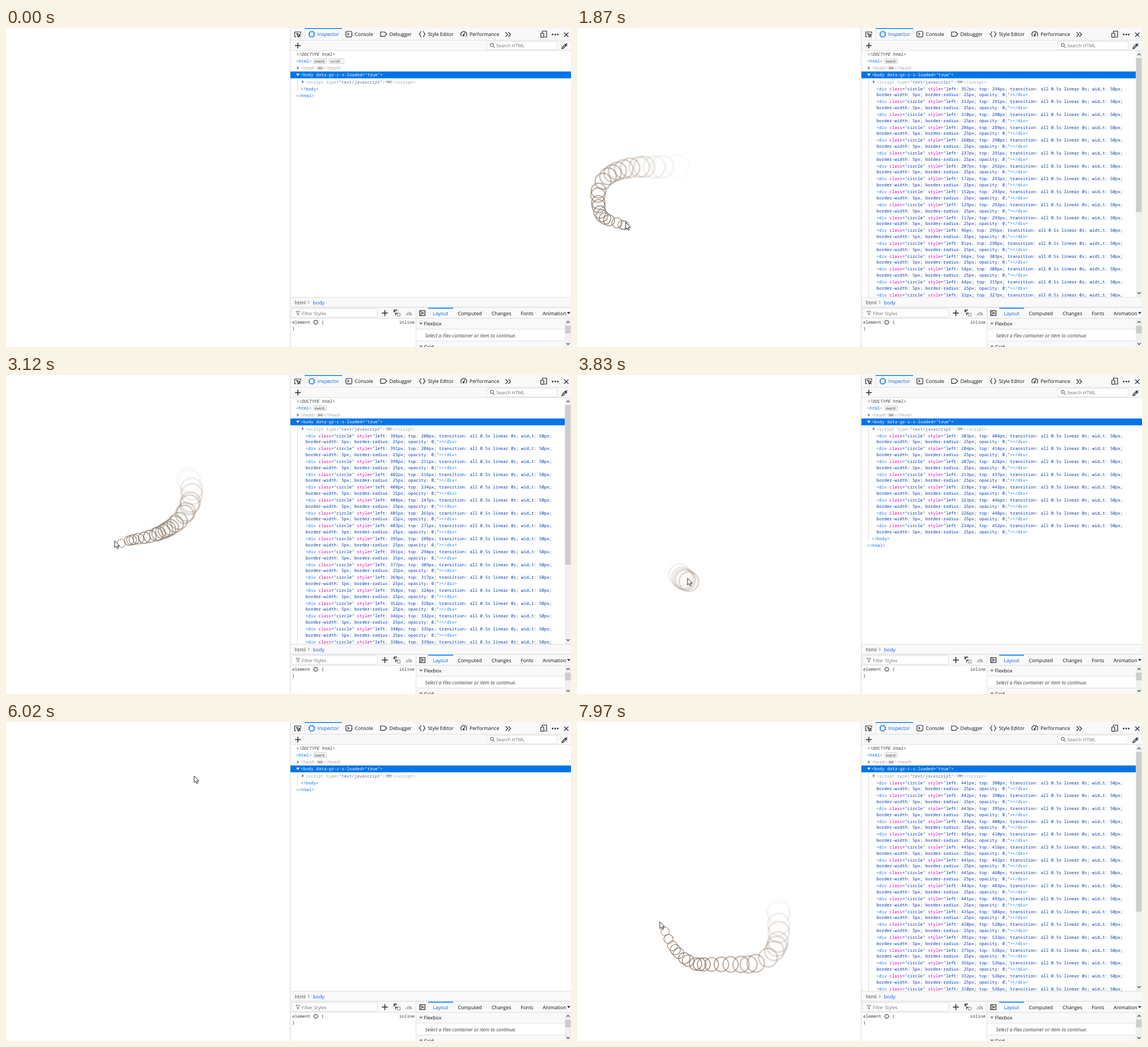
Animation, 997 px wide and 562 px high, one loop 8 s. Source, as an HTML page:

```html
<!DOCTYPE html>
<html lang="en">
<head>
<meta charset="utf-8">
<title>Cursor trail with inspector</title>
<style>
html, body { margin: 0; width: 100%; height: 100%; overflow: hidden; background: #fff; }
svg { display: block; width: 997px; height: 562px; }
text { white-space: pre; text-rendering: geometricPrecision; font: 8.65px "Open Sans", "Noto Sans", sans-serif; fill: #0c0c0d; }
.code text { font: 500 7.56px "Noto Sans Mono", "DejaVu Sans Mono", monospace; fill: #38383d; }
text.small { font-size: 8.2px; fill: #737373; }
text.blue { fill: #0060df; }
.code .tag { fill: #0074e8; }
.code .attr { fill: #dd00a9; }
.code .val { fill: #003eaa; }
.code .dim { fill: #a5a5a8; }
.code .sel { fill: #fff; }
.code .hot tspan { fill: #2b2108; }
.badge rect { fill: #f4f4f5; stroke: #c4c4c6; stroke-width: .8; }
.badge text { font-size: 6.8px; font-weight: 500; fill: #38383d; }
.icon { fill: none; stroke: #2a2a2e; stroke-width: 1.2; }
.edge { fill: none; stroke: #e0e0e2; }
.bar { fill: #f9f9fa; }
.track { fill: #f0f0f0; }
.thumb { fill: #cdcdcd; }
.arrow { fill: none; stroke: #505050; stroke-width: 1.3; }
.fold { fill: #8a8a8d; }
#trail circle { fill: none; stroke: #89725f; }
</style>
</head>
<body>
<svg viewBox="0 0 997 562">
  <g id="trail"></g>
  <g id="pageScroll">
    <rect class="track" y="550" width="502" height="12"/>
    <rect class="thumb" x="11" y="550.5" width="458" height="11"/>
    <path class="arrow" d="M6.5 553.5l-2.6 2.8 2.6 2.8M494 553.5l2.6 2.8-2.6 2.8"/>
  </g>

  <rect x="502" width="495" height="562" fill="#fff"/>
  <path d="M501.5 0v562" stroke="#d7d7da"/>
  <g class="code">
    <path id="guide" stroke="#dcdcde" fill="none"/>
    <rect x="502" y="76.6" width="495" height="12" fill="#0074e8"/>
    <text x="512" y="49.2" style="font-style:italic">&lt;!DOCTYPE html&gt;</text>
    <text x="512" y="61.2"><tspan class="tag">&lt;html&gt;</tspan></text>
    <path class="fold" d="M513.5 67.4l4 3-4 3z"/>
    <text x="520" y="73.3"><tspan class="dim">&lt;head&gt;</tspan></text>
    <text x="560" y="73.3"><tspan class="dim">&lt;/head&gt;</tspan></text>
    <path d="M511.8 80.6h6.4l-3.2 4z" fill="#fff"/>
    <text x="520" y="85.4"><tspan class="sel">&lt;body data-gr-c-s-loaded="true"&gt;</tspan></text>
    <path class="fold" d="M522 91.8l4 3-4 3z"/>
    <text x="528.6" y="97.6"><tspan class="dim">&lt;script type=</tspan><tspan fill="#5f6f96">"text/javascript"</tspan><tspan class="dim">&gt;</tspan></text>
    <text x="682" y="97.6"><tspan class="dim">&lt;/script&gt;</tspan></text>
    <g id="rows"></g>
    <g id="tail">
      <text x="520" y="3"><tspan class="tag">&lt;/body&gt;</tspan></text>
      <text x="512" y="15"><tspan class="tag">&lt;/html&gt;</tspan></text>
    </g>
  </g>
  <g class="badge">
    <rect x="542.8" y="54" width="22.6" height="8.6" rx="1.5"/><text x="545" y="60.5">event</text>
    <g id="scrollBadge"><rect x="570" y="54" width="26.5" height="8.6" rx="1.5"/><text x="572.6" y="60.5">scroll</text></g>
    <rect x="549" y="67.6" width="10" height="6" rx="1.5"/><rect x="670.5" y="91.7" width="10" height="6" rx="1.5"/>
    <path d="M551 70.6h6.6M672.5 94.7h6.6" stroke="#333" stroke-width="1.6" stroke-dasharray="1.6 .9"/>
  </g>
  <g id="listScroll">
    <rect class="track" x="986" y="40" width="11" height="434"/>
    <rect id="listThumb" class="thumb" x="986.5" y="53" width="10"/>
    <path class="arrow" d="M989 48l2.8-2.8 2.8 2.8M989 465.5l2.8 2.8 2.8-2.8"/>
  </g>

  <!-- toolbars -->
  <rect class="bar" x="502" width="495" height="39"/>
  <path class="edge" d="M502 21.5h495M502 39.5h495M527.5 0v21"/>
  <path d="M527 .8h66" stroke="#0a84ff" stroke-width="1.6"/>
  <rect class="edge" x="848.5" y="23.5" width="124" height="15" style="fill:#fff"/>
  <g class="icon">
    <path d="M512 15.5h-2.5v-8.5h10.5v3.5M513 9.5l6.5 2.6-2.6 1.2-1.3 2.7zM516.8 13.2l3 3"/>
    <path d="M515 26v10M510 31h10" stroke-width="1.5"/>
    <g stroke="#0a70e8"><rect x="535.5" y="7" width="8" height="8" rx="1"/><path d="M537.8 7v-2M541.2 7v-2M537.8 15v2M541.2 15v2M535.5 9.3h-2M535.5 12.7h-2M543.5 9.3h2M543.5 12.7h2"/></g>
    <rect x="599.8" y="6" width="10.5" height="9.6" rx="1.5"/><path d="M602.5 8.5l2.4 2.3-2.4 2.3"/>
    <path d="M661 7h7l4 3.8-4 3.9h-7z"/>
    <path d="M733 6c-2.5 0-1 4-3.5 4.8 2.5.8 1 4.8 3.5 4.8M736 6c2.5 0 1 4 3.5 4.8-2.5.8-1 4.8-3.5 4.8"/>
    <path d="M804 14.8a5.2 5.2 0 1 1 7.6 0M807.5 13l2-5"/><circle cx="807.4" cy="13" r="1.2"/>
    <path d="M881.5 7.5l4 4-4 4M886.5 7.5l4 4-4 4"/>
    <path d="M946.5 8.5v-3h7.5v10.5h-4.5"/><rect x="943.6" y="9" width="5.4" height="7.4" rx=".8"/>
    <path d="M963.3 11.5h11.5" stroke-width="2.6" stroke-dasharray="2.6 1.9"/>
    <path d="M985 8l7.5 7.5M992.5 8l-7.5 7.5"/>
    <path d="M981 36.5l.6-2.3 5-5 1.8 1.8-5 5zM986.2 27.6l4 4M988 29.5l2.4-2.4" stroke-width="1.3"/>
    <g stroke="#737373"><circle cx="857.2" cy="29.8" r="2.7"/><path d="M859.2 31.8l3 3"/></g>
  </g>
  <text class="blue" x="549.6" y="14.3">Inspector</text>
  <text x="615.6" y="14.3">Console</text>
  <text x="676.6" y="14.3">Debugger</text>
  <text x="744.4" y="14.3">Style Editor</text>
  <text x="818" y="14.3">Performance</text>
  <text class="small" x="865" y="34.1">Search HTML</text>

  <!-- lower panes -->
  <rect x="502" y="474" width="495" height="88" fill="#fff"/>
  <path class="bar" d="M502 474h495v18H502zM502 493h495v18H502zM724 512h262v18H724zM724 552h262v10H724z"/>
  <path class="edge" d="M502 474.5h495M502 511.5h495M724 530.5h262M724 551.5h262M723.5 493v69"/>
  <path d="M502 492h495" stroke="#cfcfd2"/>
  <rect class="edge" x="504.5" y="494.5" width="151" height="15" style="fill:#fff"/>
  <path d="M745 493.6h44" stroke="#0a84ff" stroke-width="1.6"/>
  <text x="509.8" y="486.6" style="fill:#38383d">html</text>
  <text class="blue" x="541.8" y="486.6">body</text>
  <text class="small" x="522" y="505.6">Filter Styles</text>
  <text x="704.6" y="505.6" style="font-size:8px;fill:#38383d">.cls</text>
  <text class="blue" x="753.2" y="506">Layout</text>
  <text x="797.2" y="506">Computed</text>
  <text x="857" y="506">Changes</text>
  <text x="908.2" y="506">Fonts</text>
  <text x="947" y="506">Animation</text>
  <rect class="bar" x="988" y="494" width="9" height="17"/>
  <text x="737.5" y="524.2">Flexbox</text>
  <text x="739.6" y="544.6" style="font-style:italic;fill:#38383d">Select a Flex container or item to continue.</text>
  <text x="737.5" y="564.6">Grid</text>
  <g class="code">
    <text x="505" y="520.8">element</text><text x="556.5" y="520.8">{</text>
    <text x="505" y="532">}</text><text x="693.8" y="520.8">inline</text>
  </g>
  <path d="M729 519h6.4l-3.2 4zM729 559.6h6.4l-3.2 4z" class="fold"/>
  <path d="M990 500.5h6l-3 3.6z" fill="#2a2a2e"/>
  <g class="icon">
    <path d="M532.6 480.6l2.7 2.7-2.7 2.7" stroke="#737373" stroke-width="1"/>
    <path d="M511.5 499h7l-2.6 3.4v3.6l-1.8-1.2v-2.4z" stroke="#737373" stroke-width="1"/>
    <path d="M668.5 497v10.5M663.3 502.3h10.5" stroke-width="1.5"/>
    <path d="M684 497h6M684 499.3h3.5M684.7 497v4M686.8 502.5h5M687.5 502v4" stroke-width="1.3"/>
    <rect x="690.5" y="502.5" width="5" height="5" stroke="#909094" stroke-width="1"/>
    <rect x="729.8" y="498" width="9.6" height="8.6"/><path d="M732.3 498v8.6M734.5 500.5l3 1.8-3 1.8z" stroke-width="1"/>
    <g stroke="#55555a" stroke-width="1"><rect x="543.7" y="515.7" width="5.6" height="5.6"/><path d="M546.5 514v2M546.5 521.3v2M542 518.5h2M549.3 518.5h2"/></g>
  </g>
  <rect class="track" x="986" y="512" width="11" height="50"/>
  <rect class="thumb" x="986.5" y="524.5" width="10" height="13.5"/>
  <path class="arrow" d="M989 519.5l2.8-2.8 2.8 2.8M989 555l2.8 2.8 2.8-2.8"/>
  <path id="cursor" d="M0 0v12l2.8-2.6 1.9 4.3 2-.9-1.9-4.1h3.8z" fill="#fff" stroke="#111" stroke-width=".9"/>
</svg>
<script>
const LOOP = 8000, FRAME = 78.15, LIFE = 520, ROW = 22.68, MAX_ROWS = 17;
const PAGE_EDGE = 501;
const $ = id => document.getElementById(id);
const show = (node, on) => node.setAttribute('visibility', on ? 'visible' : 'hidden');

function make(name, attrs = {}) {
  const node = document.createElementNS('http://www.w3.org/2000/svg', name);
  for (const key in attrs) node.setAttribute(key, attrs[key]);
  return node;
}
const add = (parent, name, attrs) => parent.appendChild(make(name, attrs));

// Each stroke moves the pointer along a curve at constant speed.
function stroke(start, end, d) {
  const curve = make('path', { d });
  return { start, end, curve, length: curve.getTotalLength() };
}

const strokes = [
  stroke(70, 460, 'M927 545L799 275'),
  stroke(620, 1075, 'M799 275L500 278'),
  stroke(1075, 1400, 'M500 278C400 272 330 243 240 242L137 245'),
  stroke(1400, 1800, 'M137 245C60 240 35 270 37 300S40 335 70 343'),
  stroke(1800, 1940, 'M70 343Q90 351 110 352'),
  stroke(1940, 2422, 'M110 352L155 349Q216 345 217 321L228 235Q229 205 251 194L257 188'),
  stroke(2422, 3220, 'M257 188C285 155 330 170 328 209S290 280 236 288S185 315 174 325'),
  stroke(3220, 3455, 'M174 325Q174 358 201 365'),
  stroke(4710, 5236, 'M201 365C245 345 262 300 272 265S308 170 325 128'),
  stroke(5236, 5415, 'M325 128Q334 112 338 102'),
  stroke(6870, 7272, 'M338 102C324 140 327 190 330 225L348 277'),
  stroke(7272, 7465, 'M348 277L356 335'),
  stroke(7465, 7973, 'M356 335V379Q352 420 306 427H212Q170 415 152 359')
];

function pointerAt(t) {
  const { start, end, curve, length } = strokes.findLast(s => s.start <= t) || strokes[0];
  const part = Math.min(1, Math.max(0, (t - start) / (end - start)));
  return curve.getPointAtLength(part * length);
}

let seed = 7;
function random() {
  seed = seed * 16807 % 2147483647;
  return seed / 2147483647;
}

// While the pointer moves over the page it drops rings at uneven intervals.
const rings = [];
for (let t = 0; t < LOOP; t += 12 + 30 * random() ** 2) {
  const { x, y } = pointerAt(t);
  if (x > PAGE_EDGE || !strokes.some(s => s.start <= t && t < s.end)) continue;
  const born = t + 10, last = rings.at(-1);
  rings.push({
    born,
    fresh: !last || born - last.born > LIFE,
    left: Math.round((x - 22) / .75),
    top: Math.round((y - 25) / .75),
    node: add($('trail'), 'circle', { cx: x, cy: y })
  });
}

const rows = Array.from({ length: MAX_ROWS }, (_, i) => {
  const y = 101 + i * ROW, group = add($('rows'), 'g');
  return {
    group,
    back: add(group, 'rect', { x: 502, y: y - .2, width: 495, height: ROW, fill: '#e5b062' }),
    first: add(group, 'text', { x: 528.6, y: y + 8.7 }),
    second: add(group, 'text', { x: 528.6, y: y + 19.4 })
  };
});

const span = (kind, text) => `<tspan class="${kind}">${text}</tspan>`;
for (const row of rows)
  row.second.innerHTML = span('val', 'border-width: 5px; border-radius: 25px; opacity: 0;"') + span('tag', '&gt;&lt;/div&gt;');

function openingTag({ left, top }) {
  const cut = 'width'.slice(0, 9 - `${left}${top}`.length);
  return span('tag', '&lt;div') + ' ' + span('attr', 'class') + span('val', '="circle"') + ' ' +
    span('attr', 'style') +
    span('val', `="left: ${left}px; top: ${top}px; transition: all 0.5s linear 0s; ${cut}…t: 50px;`);
}

function drawRings(t) {
  for (const { node, born } of rings) {
    const age = (t - born) / LIFE, alive = age >= 0 && age < 1;
    show(node, alive);
    if (!alive) continue;
    const width = .9 + 2.85 * age;
    node.setAttribute('r', 7.7 + 14.8 * age - width / 2);
    node.setAttribute('stroke-width', width);
    node.setAttribute('opacity', 1 - age);
  }
}

// The inspector refreshes in batches, slightly behind the page.
function drawList(t) {
  const seen = Math.floor((t - 116) / 130) * 130 + 96;
  const listed = rings.filter(r => r.born <= seen && seen < r.born + LIFE);
  rows.forEach((row, i) => {
    const item = listed[i];
    row.group.setAttribute('display', item ? 'inline' : 'none');
    if (!item) return;
    row.back.setAttribute('display', item.fresh ? 'inline' : 'none');
    row.group.setAttribute('class', item.fresh ? 'hot' : '');
    if (row.item !== item) row.first.innerHTML = openingTag(item);
    row.item = item;
  });
  const end = 101 + listed.length * ROW;
  $('tail').setAttribute('transform', `translate(0 ${end + 6})`);
  $('guide').setAttribute('d', `M514.5 89V${end + 11}`);
  const height = end - 40 + 23, overflow = height > 434;
  show($('listScroll'), overflow);
  $('listThumb').setAttribute('height', overflow ? 407 * 434 / height : 0);
}

function drawCursor(t) {
  const { x, y } = pointerAt(t);
  show($('cursor'), t >= 70);
  $('cursor').setAttribute('transform', `translate(${x - 6} ${y - 7})`);
}

function draw(time) {
  const step = Math.floor((time + 8) / FRAME), t = step * FRAME + 2;
  drawRings(t);
  drawList(t);
  drawCursor(t);
  show($('pageScroll'), t > 1090 && t < 1600);
  show($('scrollBadge'), t < 1700);
}

const begin = performance.now();
function tick() {
  draw((performance.now() - begin) % LOOP);
  requestAnimationFrame(tick);
}
tick();
</script>
</body>
</html>
```
